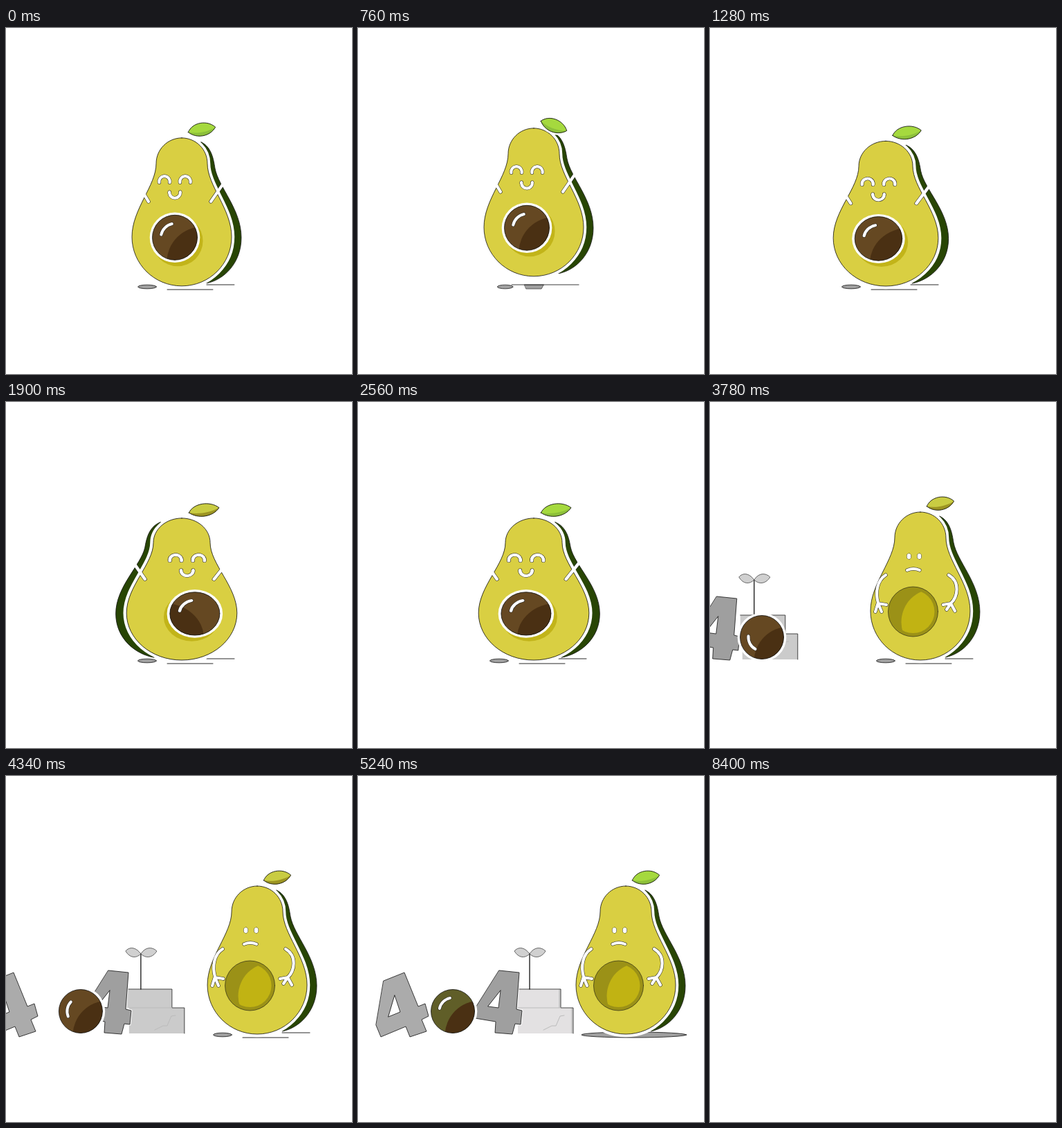
An HTML page with a canvas for the animation above (8.42 s loop, 500 by 500 pixels).

```html
<!DOCTYPE html>
<html lang="en">
<head>
<meta charset="utf-8">
<title>404</title>
<style>
html, body { margin: 0; width: 100%; height: 100%; overflow: hidden; background: #fff; }
canvas { display: block; width: 500px; height: 500px; }
</style>
</head>
<body>
<canvas id="stage" width="500" height="500"></canvas>
<script>
const ctx = document.getElementById('stage').getContext('2d');
const LOOP = 8420, BLANK = 8400;
const HOP = 660, LANDING = 80, HOPS_END = 2640;
const POP = 2700, SLIDE = 3000, TURN = 3780, SETTLE = 4860;
const TAU = Math.PI * 2, RAD = Math.PI / 180;

const clamp = v => Math.min(1, Math.max(0, v));
const span = (t, a, b) => clamp((t - a) / (b - a));
const ease = u => (1 - Math.cos(Math.PI * u)) / 2;
const mix = (a, b, u) => a + (b - a) * u;

function circle(x, y, r) {
  const p = new Path2D();
  p.arc(x, y, r, 0, TAU);
  return p;
}

function arc(x, y, r, from, to) {
  const p = new Path2D();
  p.arc(x, y, r, from * RAD, to * RAD);
  return p;
}

function ellipse(x, y, rx, ry) {
  const p = new Path2D();
  p.ellipse(x, y, rx, ry, 0, 0, TAU);
  return p;
}

function stroke(path, color, width) {
  ctx.strokeStyle = color;
  ctx.lineWidth = width;
  ctx.stroke(path);
}

function paint(path, color, edge = 0.8) {
  ctx.fillStyle = color;
  ctx.fill(path, 'evenodd');
  if (edge) stroke(path, '#111', edge);
}

// White gaps are holes in the picture, so they vanish on the white page.
function erase(path, width, filled) {
  ctx.globalCompositeOperation = 'destination-out';
  if (filled) ctx.fill(path);
  if (width) stroke(path, '#000', width);
  ctx.globalCompositeOperation = 'source-over';
}

function gapLine(path, width = 4.2) {
  ctx.globalCompositeOperation = 'source-atop';
  stroke(path, '#222', width + 1);
  erase(path, width);
}

function clipped(path, draw) {
  ctx.save();
  ctx.clip(path);
  draw();
  ctx.restore();
}

const body = new Path2D('M0 159C20.4 159 37 175.6 37 196C37 228 72 262 72 302' +
  'C72 341 40 373 0 373C-40 373 -72 341 -72 302C-72 262 -37 228 -37 196C-37 175.6 -20.4 159 0 159Z');
const back = new Path2D('M28 165C43 172 46 190 48 203C53 230 86 262 86 303C86 340 61 364 36 369L0 330V200Z');
const leaf = new Path2D('M-20 0C-12 -13 10 -13 20 0C10 12 -10 12 -20 0Z');
const leafShade = new Path2D('M-20 0C-8 5 8 5 20 0C10 12 -10 12 -20 0Z');
const wavingArms = new Path2D('M-48 251L-63 226M42 251L60 225');
const sadArms = new Path2D('M-50 250C-63 258 -65 276 -61 290M-61 290L-65 303M-61 291L-56 303M-61 291L-49 293' +
  'M41 250C58 260 54 282 44 291M44 291L33 293M44 291L38 300M44 291L50 302');
const leftFour = new Path2D('M37 296L67 284L87 333L97 329L102 347L92 352L99 369L75 377L69 362L33 377L26 360Z' +
  'M53 317L61 341L44 348Z');
const rightFour = new Path2D('M204 281L233 284L229 337L237 339L235 359L227 358L223 373L198 371L199 355L169 350L171 333Z' +
  'M206 310L203 335L188 333Z');
const sprout = new Path2D('M248 257C240 246 231 247 226 253C232 263 241 264 248 257C255 264 265 263 271 253C265 247 255 246 248 257Z');

function drawPit(r, side, turn, base) {
  const pit = circle(0, 0, r), f = r / 33;
  erase(circle(0, 0, r + 3.8), 0, true);
  paint(pit, base, 0);
  clipped(pit, () => paint(circle(41 * f * side, 37 * f, 53 * f), '#4a3013', 0));
  stroke(pit, '#111', 0.8);
  gapLine(arc(0, 0, 20.5 * f, 192 + turn, 258 + turn), 4);
}

function drawHole() {
  const inner = circle(-10.5, 303, 31);
  paint(circle(-10.5, 303, 36), '#9b9117', 0.6);
  clipped(inner, () => paint(circle(20.5, 318, 48), '#c1b313', 0));
}

function drawHappyFace(x) {
  for (const eye of [-15, 15]) gapLine(arc(x + eye, 222, 7.7, 170, 370));
  gapLine(arc(x, 238, 7.9, -5, 185));
}

function drawSadFace() {
  for (const x of [-16.5, -1.5]) {
    const eye = ellipse(x, 223, 3, 4);
    stroke(eye, '#222', 1);
    erase(eye, 0, true);
  }
  gapLine(new Path2D('M-19 243Q-10 239 -1 243'), 4);
}

function drawShadow(x, up, settled) {
  if (settled) return paint(ellipse(x + 12, 374, 76, 4), '#a0a0a0');
  ctx.save();
  ctx.translate(x + 6, 0);
  ctx.scale(1 - up * 0.011, 1);
  paint(ellipse(-56, 374, 13.5, 2.8), '#a0a0a0');
  if (up > 4) paint(new Path2D('M-23 371H10L6 377H-20Z'), '#a0a0a0', 0.6);
  stroke(new Path2D(up > 4 ? 'M-45 371H70' : 'M30 371H70M-27 378H39'), '#111', 0.9);
  ctx.restore();
}

function hopPose(t) {
  if (t >= HOPS_END) return { squash: 0, up: 0, lag: 0, side: 1 };
  const clock = t + LANDING, phase = clock % HOP, hop = Math.floor(clock / HOP);
  const air = span(phase, LANDING, HOP - LANDING);
  const turned = ease(span(phase, 130, 530));
  return {
    squash: Math.max(0, 1 - phase / LANDING, (phase - HOP + LANDING) / LANDING),
    up: 22 * 4 * air * (1 - air),
    lag: Math.sin(TAU * air),
    side: hop === 2 ? 1 - 2 * turned : hop === 3 && phase >= 0 ? 2 * ease(span(phase, 130, 530)) - 1 : 1
  };
}

function drawAvocado(t, x) {
  const { squash, up, lag, side } = hopPose(t);
  const sad = t >= POP, settled = t >= SETTLE;
  const turn = (1 - side) / 2;
  drawShadow(x, up, settled);

  ctx.save();
  ctx.translate(x, 373 - up);
  ctx.scale(1 + 0.11 * squash, 1 - 0.042 * squash);
  ctx.translate(0, -373);

  ctx.save();
  ctx.scale(Math.abs(side) < 0.01 ? 0.01 : side, 1);
  paint(back, '#284504');
  ctx.restore();
  erase(body, 8.5);
  paint(body, '#d9cf42');

  if (sad) {
    drawHole();
    drawSadFace();
    gapLine(sadArms);
  } else {
    const pitX = mix(-10, 17, turn);
    paint(circle(pitX + 4 * side, 308, 36.5), '#c2b419', 0);
    ctx.save();
    ctx.translate(pitX, 303);
    drawPit(32.5, side, 0, '#654822');
    ctx.restore();
    drawHappyFace(mix(-10, 7, turn));
    gapLine(wavingArms);
  }

  ctx.translate(29, 147 + 9 * lag);
  ctx.rotate((-11 + 33 * lag) * RAD);
  const pale = side < 0 || (sad && !settled);
  erase(leaf, 6);
  paint(leaf, pale ? '#c9cc42' : '#a5d93e', 0);
  paint(leafShade, pale ? '#9c9422' : '#8dc03a', 0);
  stroke(leaf, '#111', 0.8);
  ctx.restore();
}

function drawBlocks(settled) {
  const light = settled ? '#e3e1e2' : '#cbcbcb';
  const rows = [[228, 308, 65, 27], [231, 335, 80, 37]];
  for (const [x, y, w, h] of rows) {
    ctx.fillStyle = light;
    ctx.fillRect(x, y, w, h);
    ctx.fillStyle = '#c9c9c9';
    ctx.fillRect(x + w - 3, y, 3, h);
  }
  stroke(new Path2D('M228 308H293V335H311V372'), '#333', 0.9);
  stroke(new Path2D('M231 335H293'), '#bbb', 1);
  stroke(new Path2D('M268 367L280 361H286L292 347L298 346'), '#bbb', 1);
  stroke(new Path2D('M248 258V308'), '#111', 1.3);
  paint(sprout, '#d0d0d0', 0.6);
}

function drawNumber(t, slide) {
  const remaining = 1 - slide;
  ctx.save();
  ctx.translate(-295 * remaining, 0);
  drawBlocks(t >= SETTLE);
  ctx.restore();
  ctx.save();
  ctx.translate(-311 * remaining, 0);
  for (const [four, gray] of [[rightFour, '#9f9f9f'], [leftFour, '#ababab']]) {
    erase(four, 3);
    paint(four, gray);
  }
  ctx.restore();
}

function drawLoosePit(t) {
  const away = ease(span(t, POP, TURN)), home = ease(span(t, TURN, SETTLE));
  const fall = span(t, POP, POP + 260);
  ctx.save();
  ctx.translate(mix(mix(244, 75, away), 137, home), mix(303, 340, fall * fall));
  drawPit(mix(32.5, 31.5, fall), 1, mix(-433 * away, -360, home), t >= SETTLE ? '#605e28' : '#654822');
  ctx.restore();
}

function draw(t) {
  ctx.clearRect(0, 0, 500, 500);
  if (t >= BLANK) return;
  const slide = ease(span(t, SLIDE, SETTLE));
  drawAvocado(t, 254 + 133 * slide);
  if (t >= SLIDE) drawNumber(t, slide);
  if (t >= POP) drawLoosePit(t);
}

ctx.lineCap = 'round';
ctx.lineJoin = 'round';
const start = performance.now();
function tick() {
  draw((performance.now() - start) % LOOP);
  requestAnimationFrame(tick);
}
tick();
</script>
</body>
</html>
```
